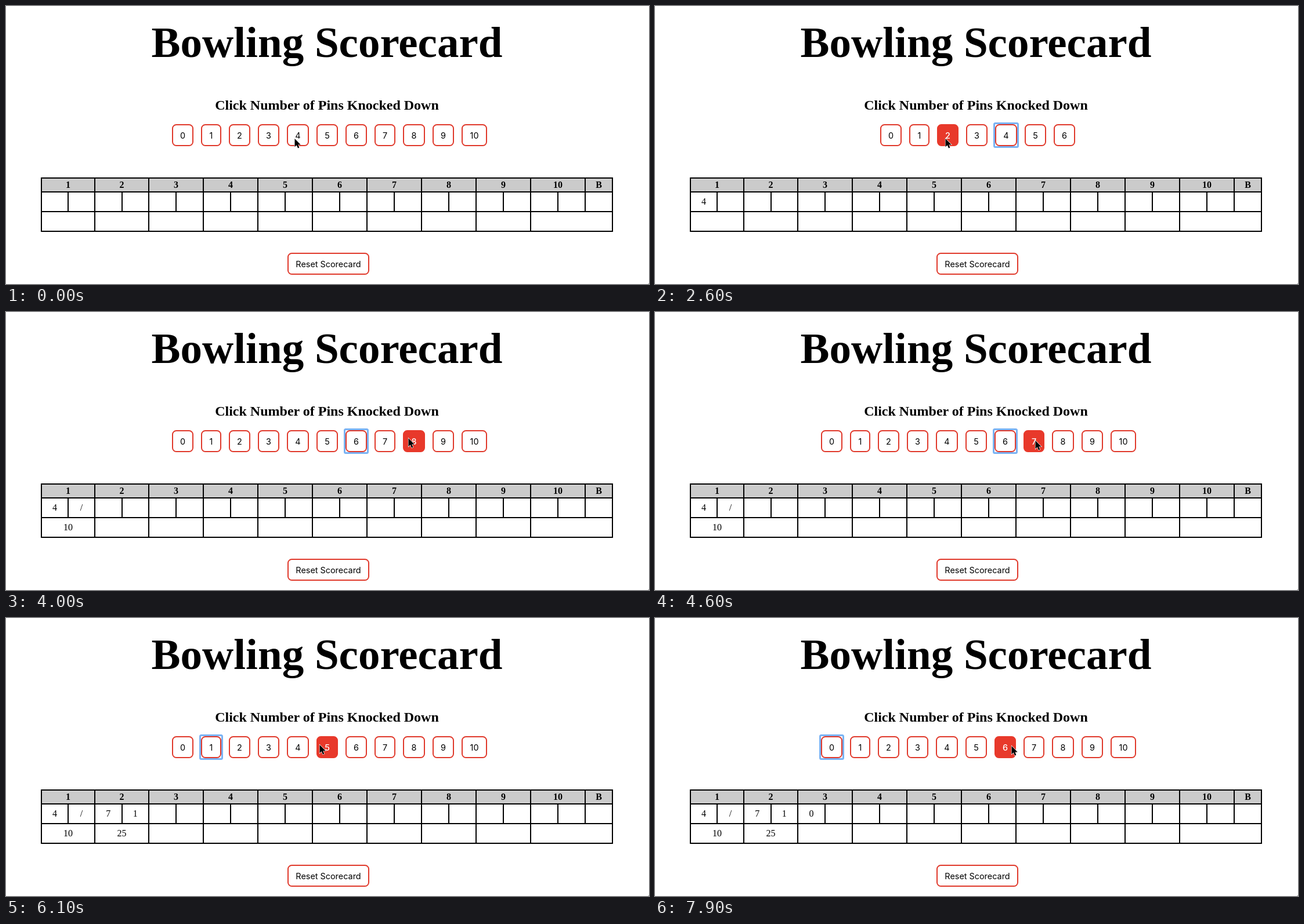
Recreate the animation shown at these times as an HTML page. Size 1108 by 480 pixels, loop 8 s.

```html
<!DOCTYPE html>
<html lang="en">
<head>
<meta charset="utf-8">
<title>Bowling Scorecard</title>
<style>
html, body { margin: 0; width: 100%; height: 100%; overflow: hidden; background: #fff; }
svg { display: block; width: 1108px; height: 480px; }
text { text-anchor: middle; font: 16px "Liberation Serif", serif; }
.title { font-size: 75px; font-weight: bold; }
.prompt { font-size: 24px; font-weight: bold; }
.head { font-weight: bold; }
.label { font: 14.4px Inter, sans-serif; }
.button { fill: #fff; stroke: #e0392b; stroke-width: 2; }
.hover .button { fill: #e8392b; stroke: #e8392b; }
.hover .label { fill: #fff; font-weight: 500; }
.ring { fill: #fff; stroke: #79b2f3; stroke-width: 3; }
.grid { fill: none; stroke: #000; stroke-width: 2; }
.cursor { stroke: #fff; stroke-width: 1.2; paint-order: stroke; }
</style>
</head>
<body>
<svg viewBox="0 0 1108 480">
  <text class="title" x="553" y="88">Bowling Scorecard</text>
  <text class="prompt" x="553" y="179">Click Number of Pins Knocked Down</text>
  <g id="card"></g>
  <g id="live"></g>
  <path d="M1107 479h1v1h-1z" fill="#777"/>
</svg>
<script>
const LOOP = 8000, STEP = 100, HOVER_LAG = 60;
const BUTTON_TOP = 204, BUTTON_HEIGHT = 38, GAP = 13;
const buttonWidths = [37, 35, 37, 37, 38, 37, 37, 36, 38, 37, 44];
const rowStart = { 11: 286, 7: 388, 4: 463 };

// Each state holds from its time: number of buttons, focused button, rolls, totals.
const states = [
  { at: 0, count: 11, focus: -1, rolls: '', totals: [] },
  { at: 2200, count: 7, focus: 4, rolls: '4', totals: [] },
  { at: 3500, count: 11, focus: 6, rolls: '4/', totals: [10] },
  { at: 4700, count: 4, focus: -1, rolls: '4/7', totals: [10] },
  { at: 5900, count: 11, focus: 1, rolls: '4/71', totals: [10, 25] },
  { at: 7300, count: 11, focus: 0, rolls: '4/710', totals: [10, 25] }
];

// Pointer stops: time, x, y
const stops = [
  [0, 497, 229], [300, 500, 229], [2600, 500, 229], [3100, 703, 224],
  [3600, 703, 224], [4000, 693, 218], [4500, 655, 222], [4800, 655, 222],
  [5500, 540, 219], [6250, 540, 219], [7130, 306, 225], [7400, 306, 225],
  [7900, 614, 221], [8000, 614, 221]
];

const label = (x, y, value, cls = '') => `<text class="${cls}" x="${x}" y="${y}">${value}</text>`;
const box = (x, y, w, h, r, cls) =>
  `<rect class="${cls}" x="${x}" y="${y}" width="${w}" height="${h}" rx="${r}"/>`;
const button = (x, y, w, value) =>
  box(x + 1, y + 1, w - 2, BUTTON_HEIGHT - 2, 6.5, 'button') + label(x + w / 2, y + 25, value, 'label');

// Left edge of a bowling frame, counted from 0
const edge = i => i === 0 ? 61 : i === 1 ? 153 : 246 + (i - 2) * 94;
const middle = i => (edge(i) + edge(i + 1)) / 2;

function drawCard() {
  let lines = 'M61 297H1045V389H61ZM61 321H1045M61 355H1045M998 297V355';
  let heads = label(1021.5, 314, 'B', 'head');
  for (let i = 0; i < 10; i++) {
    if (i) lines += `M${edge(i)} 297V389`;
    lines += `M${Math.round(middle(i))} 321V355`;
    heads += label(middle(i), 314, i + 1, 'head');
  }
  return `<path d="M61 297H1045V321H61Z" fill="#cbcbcb"/><path class="grid" d="${lines}"/>`
    + heads + button(485, 426, 141, 'Reset Scorecard');
}

function pointerAt(t) {
  const next = Math.max(1, stops.findIndex(s => s[0] > t));
  const [t0, x0, y0] = stops[next - 1], [t1, x1, y1] = stops[next];
  const u = (t - t0) / (t1 - t0), s = u * u * (3 - 2 * u);
  return [x0 + (x1 - x0) * s, y0 + (y1 - y0) * s];
}

function drawButtons(t, { count, focus }) {
  const hoverX = t < HOVER_LAG ? -1 : pointerAt(t - HOVER_LAG)[0];
  let x = rowStart[count], out = '';
  for (let i = 0; i < count; i++) {
    const w = buttonWidths[i];
    const hover = hoverX >= x && hoverX < x + w;
    if (i === focus) out += box(x - 1.5, BUTTON_TOP - 1.5, w + 3, BUTTON_HEIGHT + 3, 2, 'ring');
    out += `<g class="${hover ? 'hover' : ''}">${button(x, BUTTON_TOP, w, i)}</g>`;
    x += w + GAP;
  }
  return out;
}

function drawScores({ rolls, totals }) {
  const cells = [...rolls].map((roll, i) => {
    const f = i >> 1, quarter = (edge(f + 1) - edge(f)) / 4;
    return label(edge(f) + quarter * (i % 2 ? 3 : 1), 343, roll);
  });
  return cells.join('') + totals.map((sum, i) => label(middle(i), 377, sum)).join('');
}

function drawPointer(t) {
  const [x, y] = pointerAt(t).map(Math.round);
  return `<path class="cursor" transform="translate(${x} ${y})"
    d="M.5 0V14.3L3.8 11.2L6 16.4L8.4 15.4L6.2 10.4H10.7Z"/>`;
}

const live = document.getElementById('live');
document.getElementById('card').innerHTML = drawCard();
let shown = -1;

function render(now) {
  const t = Math.floor((now % LOOP) / STEP) * STEP;
  if (t !== shown) {
    shown = t;
    const state = states.filter(s => s.at <= t).pop();
    live.innerHTML = drawButtons(t, state) + drawScores(state) + drawPointer(t);
  }
}

const start = performance.now();
function tick() {
  render(performance.now() - start);
  requestAnimationFrame(tick);
}
tick();
</script>
</body>
</html>
```
